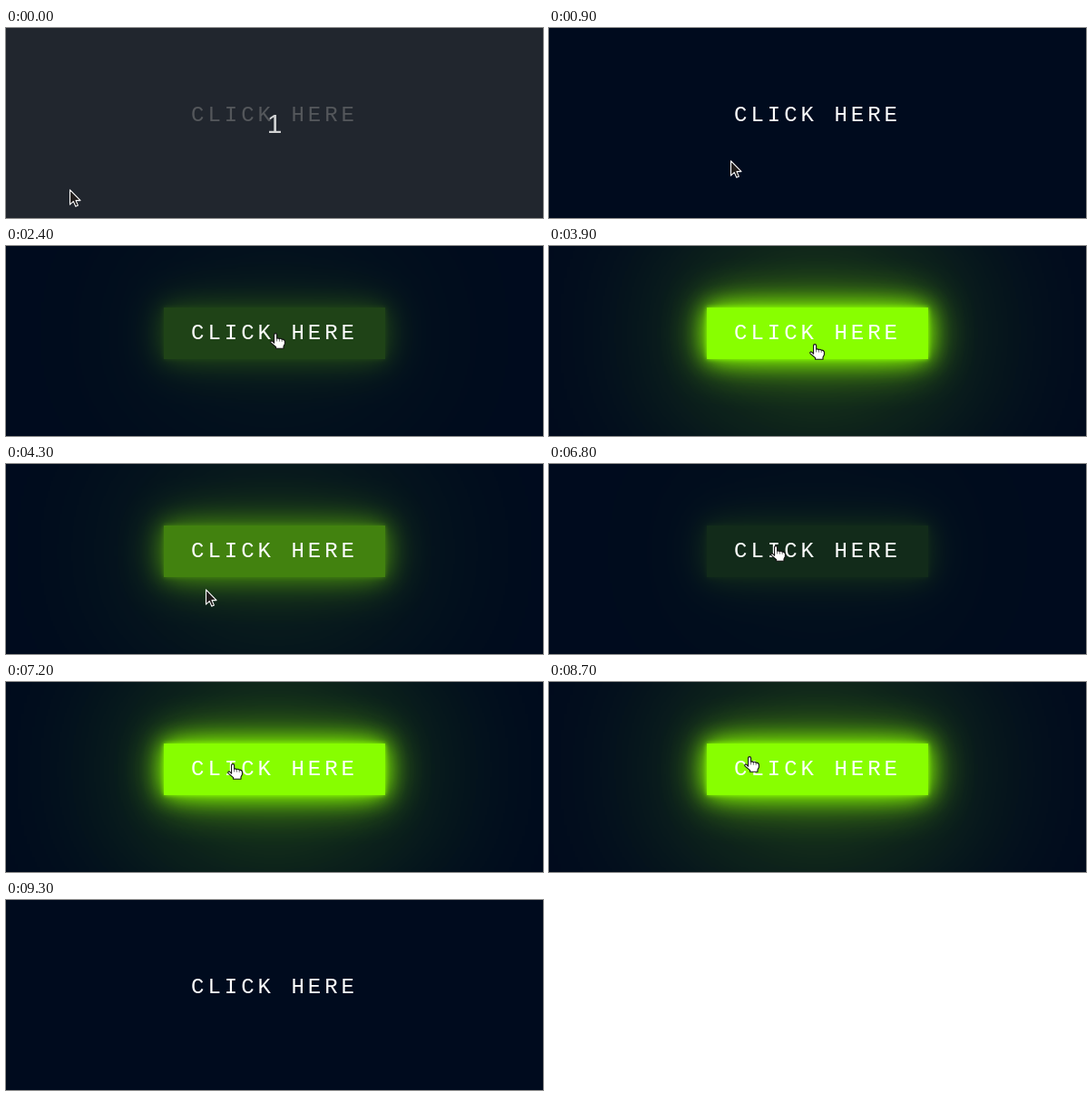
An HTML page with a canvas that plays this animation: 592 px wide and 210 px high, repeating every 9.8 s.

```html
<!DOCTYPE html>
<html lang="en">
<head>
<meta charset="utf-8">
<title>Neon button</title>
<style>
  html, body { margin: 0; width: 100%; height: 100%; overflow: hidden; background: #000b1e; }
  canvas { display: block; }
</style>
</head>
<body>
<canvas id="stage" width="592" height="210"></canvas>
<script>
const W = 592, H = 210, LOOP = 9800, STEP = 100;
const ctx = document.getElementById('stage').getContext('2d');
const BG = '#000b1e', NEON = '#88ff00';
const BOX = { x: 174, y: 68, w: 244, h: 57 };

// Pointer stops: time, x, y, easing towards the stop
const linear = u => u;
const smooth = u => u * u * (3 - 2 * u);
const easeOut = u => 1 - (1 - u) * (1 - u);
const PATH = [
  [0, 70, 178], [200, 75, 183, linear], [300, 75, 183, linear],
  [1300, 268, 126, smooth], [1700, 293, 100, easeOut], [1800, 293, 100, linear],
  [1900, 297, 96, linear], [3800, 297, 96, linear], [3900, 293, 108, linear],
  [4800, 117, 180, smooth], [5000, 103, 177, linear], [5300, 103, 177, linear],
  [5400, 158, 160, linear], [5800, 260, 80, easeOut], [6000, 260, 80, linear],
  [6200, 250, 90, linear], [8600, 250, 90, linear], [8700, 221, 82, linear],
  [9100, 90, 1, linear], [9200, 58, -24, linear]
];

// Glow transitions: start time, from, to
const FADE = 500;
const GLOWS = [[2315, 0, 1], [4150, 1, 0], [6740, 0, 1], [8760, 1, 0]];

// CSS "ease": cubic-bezier(.25, .1, .25, 1)
function ease(x) {
  if (x <= 0) return 0;
  if (x >= 1) return 1;
  const bez = (a, b, s) => 3 * a * s * (1 - s) ** 2 + 3 * b * s * s * (1 - s) + s ** 3;
  let lo = 0, hi = 1;
  for (let i = 0; i < 24; i++) {
    const mid = (lo + hi) / 2;
    if (bez(.25, .25, mid) < x) lo = mid; else hi = mid;
  }
  return bez(.1, 1, lo);
}

function glowAt(t) {
  let p = 0;
  for (const [start, from, to] of GLOWS) {
    if (t >= start) p = from + (to - from) * ease((t - start) / FADE);
  }
  return p;
}

function pointerAt(t) {
  const i = PATH.findIndex(stop => stop[0] >= t);
  if (i < 0) return null;
  if (i === 0) return { x: PATH[0][1], y: PATH[0][2] };
  const [t0, x0, y0] = PATH[i - 1], [t1, x1, y1, curve] = PATH[i];
  const u = curve((t - t0) / (t1 - t0));
  return { x: Math.round(x0 + (x1 - x0) * u), y: Math.round(y0 + (y1 - y0) * u) };
}

// Lit button with its stacked shadows, rendered once
function makeGlow() {
  const layer = document.createElement('canvas');
  layer.width = W;
  layer.height = H;
  const g = layer.getContext('2d');
  g.fillStyle = g.shadowColor = NEON;
  for (const blur of [200, 50, 25, 5]) {
    g.shadowBlur = blur;
    g.fillRect(BOX.x, BOX.y, BOX.w, BOX.h);
  }
  return layer;
}

const glow = makeGlow();
const arrow = new Path2D('M.5 .8V17.2L4.3 13.6L6.8 19.2L9.4 18.1L7 12.6H12Z');
const hand = new Path2D('M4.6 11.2V2.2Q4.6 .6 6.1 .6Q7.6 .6 7.6 2.2V6.3' +
  'Q9.2 5.2 10.3 6.6Q12 5.7 13.1 7.2Q15.6 6.7 16.4 9V12.2L15 15V17.3H6.6V15.6' +
  'L1 10.8Q.3 9.4 1.6 8.9Q2.8 8.7 4.6 11.2Z');
const knuckles = new Path2D('M7.6 6.3V9.4M10.4 6.8V9.6M13.2 7.4V9.8');

function drawPointer({ x, y }) {
  const over = x >= BOX.x && x <= BOX.x + BOX.w && y >= BOX.y - 1 && y <= BOX.y + BOX.h + 2;
  ctx.save();
  ctx.translate(over ? x - 6 : x, y);
  ctx.lineJoin = 'round';
  ctx.lineWidth = 1.1;
  ctx.fillStyle = over ? '#fff' : '#211d1c';
  ctx.strokeStyle = over ? '#111' : '#fff';
  ctx.fill(over ? hand : arrow);
  ctx.stroke(over ? hand : arrow);
  if (over) {
    ctx.lineWidth = .6;
    ctx.stroke(knuckles);
  }
  ctx.restore();
}

function drawLabel() {
  ctx.font = '24px "Liberation Mono", monospace';
  ctx.letterSpacing = '4px';
  ctx.textAlign = 'left';
  ctx.fillStyle = '#fff';
  ctx.fillText('CLICK HERE', BOX.x + 30, 103);
  ctx.letterSpacing = '0px';
}

function drawCountdown(alpha) {
  ctx.globalAlpha = alpha;
  ctx.fillStyle = 'rgba(42, 45, 51, .8)';
  ctx.fillRect(0, 0, W, H);
  ctx.font = '30px "Liberation Sans", sans-serif';
  ctx.textAlign = 'center';
  ctx.fillStyle = '#d2d3d4';
  ctx.fillText('1', 296, 116);
  ctx.globalAlpha = 1;
}

function draw(t) {
  ctx.fillStyle = BG;
  ctx.fillRect(0, 0, W, H);
  ctx.globalAlpha = glowAt(t);
  ctx.drawImage(glow, 0, 0);
  ctx.globalAlpha = 1;
  drawLabel();
  if (t < 200) drawCountdown(1 - t / 200);
  const pointer = pointerAt(t);
  if (pointer) drawPointer(pointer);
}

const begin = performance.now();
function tick() {
  const t = (performance.now() - begin) % LOOP;
  draw(Math.floor(t / STEP) * STEP);
  requestAnimationFrame(tick);
}
tick();
</script>
</body>
</html>
```
